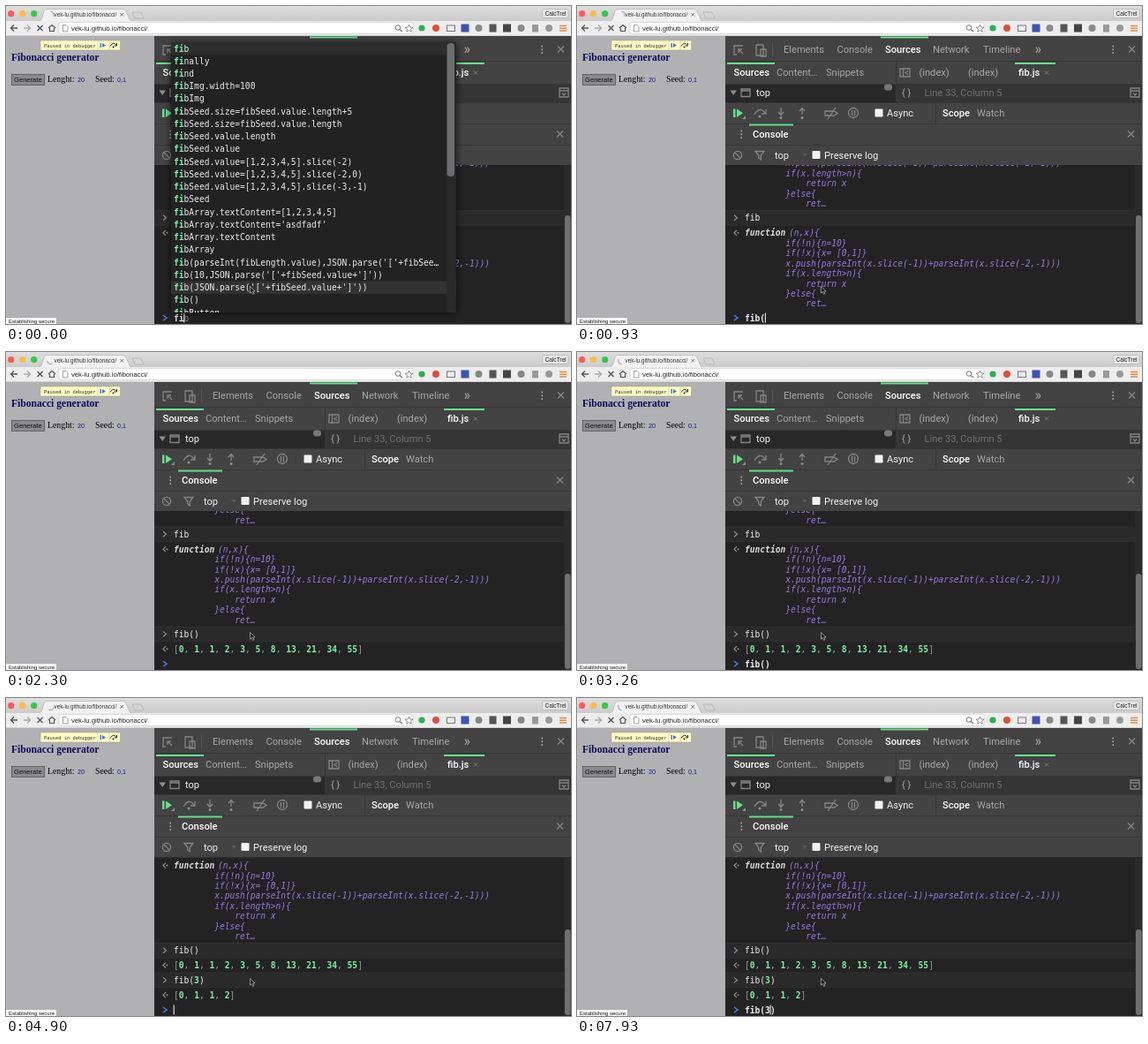
Animation, 640 px wide and 360 px high, one loop 8000 ms. Source, as an HTML page:

```html
<!DOCTYPE html>
<html lang="en">
<head>
<meta charset="utf-8">
<title>Fibonacci console</title>
<style>
  html, body { margin: 0; width: 100%; height: 100%; overflow: hidden; background: #232323; }
  svg { display: block; width: 100vw; height: 100vh; }
  text { white-space: pre; }
  .ui { font: 11.1px Roboto, sans-serif; fill: #a8a8a8; }
  .on { fill: #f2f2f2; }
  .tab { fill: #fff; font-weight: 500; }
  .faint { fill: #707070; }
  .big { font-size: 16px; }
  .sans { font-family: "Liberation Sans", Arial, sans-serif; }
  .serif { font-family: "Liberation Serif", Times, serif; }
  .mono { font: 9.6px "DejaVu Sans Mono", Menlo, monospace; fill: #ececec; }
  .bold { font-weight: bold; }
  .keyword { fill: #dcdcdc; font-weight: bold; font-style: italic; }
  .code { fill: #9479e2; font-style: italic; }
  .num { fill: #7ef0a2; font-weight: bold; }
  .dim { fill: #9a9a9a; }
  .line { fill: none; stroke: #858585; stroke-width: 1.3; }
  .accent { fill: #66e08c; }
  .spinner { transform-origin: 50.5px 10px; animation: spin .93s steps(12) infinite; }
  @keyframes spin { from { transform: rotate(-162deg); } to { transform: rotate(198deg); } }
  .popup { filter: drop-shadow(0 1px 4px #000a); }
</style>
</head>
<body>
<svg viewBox="0 0 640 360" preserveAspectRatio="none">
  <defs>
    <linearGradient id="bar" x2="0" y2="1"><stop stop-color="#dedede"/><stop offset="1" stop-color="#cbcbcb"/></linearGradient>
    <clipPath id="consoleClip"><rect x="168" y="180" width="472" height="180"/></clipPath>
    <clipPath id="popupClip"><rect x="187" y="41" width="340" height="306"/></clipPath>
  </defs>

  <!-- browser window -->
  <g class="sans">
    <rect width="640" height="17" fill="url(#bar)"/>
    <path d="M36 17.500Q40 17 41 13L43 6Q44 3.500 47 3.500H132Q135 3.500 136 6L139 13Q140 17 143 17.500Z" fill="#f1f1f1" stroke="#aaa" stroke-width=".6"/>
    <path d="M143 7H153L156 14H146Z" fill="#d5d5d5" stroke="#aaa" stroke-width=".6"/>
    <circle cx="5.700" cy="8.700" r="3.600" fill="#fc5b57"/>
    <circle cx="18.700" cy="8.700" r="3.600" fill="#fdbc40"/>
    <circle cx="31.700" cy="8.700" r="3.600" fill="#34c84a"/>
    <path class="spinner" d="M46.900 9.200A3.700 3.700 0 0 0 51.500 13.600" fill="none" stroke="#888"/>
    <text x="54.500" y="12.300" font-size="6.300" fill="#333">vek-lu.github.io/fibonacci/</text>
    <path d="M129.500 8L133 11.500M133 8L129.500 11.500" stroke="#777"/>
    <rect x="607.500" y="3.500" width="29.500" height="10" rx="2" fill="#e6e6e6" stroke="#aaa" stroke-width=".6"/>
    <text x="610.500" y="10.800" font-size="6.500" fill="#222">CalcTrel</text>
    <rect y="17" width="640" height="17" fill="#ededed"/>
    <rect x="60" y="18.500" width="401" height="13" rx="2" fill="#fff" stroke="#c6c6c6" stroke-width=".6"/>
    <path d="M13 25H5M9 21.500L5.500 25L9 28.500" fill="none" stroke="#555" stroke-width="1.300"/>
    <path d="M20 25H28M24 21.500L27.500 25L24 28.500" fill="none" stroke="#aaa" stroke-width="1.300"/>
    <path d="M35.500 22L41.500 28M41.500 22L35.500 28" stroke="#555" stroke-width="1.400"/>
    <path d="M48 25L52 21.500L56 25M49.500 25V28.500H54.500V25" fill="none" stroke="#555" stroke-width="1.200"/>
    <path d="M64.500 21.500H68L70 23.500V29H64.500Z" fill="#fff" stroke="#888" stroke-width=".8"/>
    <text x="74" y="28" font-size="7.700" fill="#222">vek-lu.github.io/fibonacci/</text>
    <circle cx="444" cy="24.500" r="2.800" fill="none" stroke="#777"/>
    <path d="M446 26.500L449 29" stroke="#777" stroke-width="1.300"/>
    <path d="M456.500 21L457.700 24L461 24.200L458.500 26.200L459.300 29.300L456.500 27.600L453.700 29.300L454.500 26.200L452 24.200L455.300 24Z" fill="none" stroke="#777" stroke-width=".8"/>
    <circle cx="471" cy="25" r="3.600" fill="#2fae57"/>
    <circle cx="487" cy="25" r="4" fill="#d8513f"/>
    <rect x="499.500" y="22" width="9" height="6.500" fill="none" stroke="#777"/>
    <rect x="515.500" y="20.500" width="9" height="9" fill="#3c55ad"/>
    <circle cx="535.500" cy="25" r="4" fill="#888"/>
    <rect x="547.500" y="20.500" width="8" height="9" fill="#555"/>
    <rect x="563" y="20.500" width="9" height="9" fill="#444"/>
    <circle cx="583.500" cy="25" r="4" fill="#888"/>
    <rect x="596" y="21" width="7" height="8.500" fill="#999"/>
    <circle cx="615" cy="25" r="4" fill="#999"/>
    <path d="M627 22.500H635M627 25.200H635M627 28H635" stroke="#e98a3c" stroke-width="1.500"/>
    <path d="M0 34H640" stroke="#aaa" stroke-width=".7"/>
  </g>

  <!-- paused page -->
  <rect y="34" width="168" height="326" fill="#b1b1b4"/>
  <rect x="39" y="39" width="90.500" height="11" rx="1" fill="#fdfbc3" stroke="#9d9b80" stroke-width=".5"/>
  <text x="43" y="46.500" font-size="5.400" font-family="DejaVu Sans Mono, monospace" fill="#333">Paused in debugger</text>
  <path d="M104 39V50M117 39V50" stroke="#c8c69c" stroke-width=".6"/>
  <path d="M106.500 42H108V47H106.500ZM109 42L113 44.500L109 47Z" fill="#4b78d4"/>
  <path d="M118 45.500Q121.500 39.500 125 44.500M125.500 42V45H122.500" fill="none" stroke="#333"/>
  <circle cx="121.500" cy="46.500" r="1" fill="#333"/>
  <g class="serif">
    <text class="bold" x="6" y="62" font-size="11.600" fill="#0c0c58">Fibonacci generator</text>
    <text x="47" y="86.300" font-size="9.800">Lenght:</text>
    <text x="101" y="86.300" font-size="9.800">Seed:</text>
  </g>
  <g class="sans">
    <rect x="6.500" y="77.500" width="37" height="12" fill="#8b8b8d" stroke="#555" stroke-width=".8"/>
    <text x="9" y="86.200" font-size="7.600" fill="#111">Generate</text>
    <text x="81" y="86" font-size="7.200" fill="#15158c">20</text>
    <text x="126" y="86" font-size="7.200" fill="#15158c">0,1</text>
    <rect y="353" width="57" height="7" fill="#f4f4f4"/>
    <text x="3" y="359" font-size="6" fill="#222">Establishing secure</text>
  </g>

  <!-- developer tools -->
  <rect x="168" y="34" width="472" height="326" fill="#232323"/>
  <rect x="168" y="34" width="472" height="146" fill="#424342"/>
  <rect x="168" y="88" width="193" height="21" fill="#282828"/>
  <rect x="361" y="88" width="279" height="21" fill="#353535"/>
  <path d="M168 62.500H640M168 88.500H640M168 109.500H640M168 133.500H640M168 157.500H640M361.500 62V109M406.500 110V133" stroke="#363636" fill="none"/>
  <path d="M221.500 42V57" stroke="#555"/>
  <g class="accent">
    <rect x="344" y="34.500" width="54" height="2"/>
    <rect x="170" y="64" width="54" height="2"/>
    <rect x="496" y="64" width="46" height="2"/>
    <rect x="195" y="133.500" width="50" height="2"/>
    <path d="M177 116.500H179.500V126H177ZM181 116.500L188 121.200L181 126Z"/>
  </g>
  <g id="labels"></g>
  <g class="line">
    <path d="M187 46V45H178V55H181M183 49L188 54M183 53V49H187"/>
    <path d="M203 44H211V56H203ZM208 49H214V57H208Z"/>
    <path d="M366 71H377V80H366ZM369.500 71V80M375 73.500L372 75.500L375 77.500"/>
    <path d="M201 123Q207 113 213 121M214 117V122H209"/>
    <path d="M231 115V123M228 120L231 123.500L234 120M255 123V115.500M252 119L255 115.500L258 119"/>
    <path d="M281 119H291L295 121.500L291 124H281ZM284 128L293 115"/>
    <path d="M311.500 118V124.500M314.500 118V124.500"/><circle cx="313" cy="121" r="5.500"/>
    <circle cx="182" cy="169" r="4.600"/><path d="M179 166L185 172"/>
    <path d="M202 164.500H212L208.300 169V174L205.700 172V169Z"/>
    <path d="M624 141.500L631 148.500M631 141.500L624 148.500M625 45.500L632 52.500M632 45.500L625 52.500"/>
    <path d="M530 73.500L534 77.500M534 73.500L530 77.500" stroke-width=".9"/>
    <path d="M627 93H637V103H627ZM627 96H637M630 98.500L632 101L634 98.500"/>
    <path d="M186 94H196V102.500H186ZM186 96H196"/>
  </g>
  <g fill="#8d8d8d">
    <path d="M173.500 95.500H181L177.200 101Z"/>
    <path d="M255 167H261L258 171Z" fill="#5a5a5a"/>
    <circle cx="207" cy="125" r="1.500"/><circle cx="231" cy="126.500" r="1.500"/><circle cx="255" cy="126.500" r="1.500"/>
    <path d="M191 128V124L187 128Z"/>
    <rect x="348" y="88.500" width="9" height="7" rx="3" fill="#777"/>
    <rect x="337.500" y="116.500" width="9" height="9" rx="1" fill="#f2f2f2"/>
    <rect x="266.500" y="164" width="9" height="9" rx="1" fill="#f2f2f2"/>
  </g>

  <g clip-path="url(#consoleClip)">
    <g id="history"></g>
    <path d="M178 350L182 353L178 356" fill="none" stroke="#4d7df0" stroke-width="1.500"/>
    <text id="prompt" class="mono bold" x="190" y="356.500"></text>
    <rect id="caret" y="347.500" width="1" height="11" fill="#fff"/>
    <rect x="632" y="180" width="8" height="180" fill="#2b2b2b"/>
    <rect id="thumb" x="633" width="6.500" rx="3.200" fill="#707070"/>
  </g>
  <g id="popups"></g>
  <path d="M276.500 317.500V325L278.300 323.400L279.600 326.300L281 325.600L279.700 322.900H282Z" fill="#111" stroke="#ddd" stroke-width=".6"/>
</svg>

<script>
const $ = id => document.getElementById(id);
const LOOP = 8000, CHAR = 5.78, LEFT = 190, ROW = 16.8;

function add(parent, tag, attrs = {}, content = "") {
  const node = document.createElementNS("http://www.w3.org/2000/svg", tag);
  for (const key in attrs) node.setAttribute(key, attrs[key]);
  node.textContent = content;
  return parent.appendChild(node);
}

// parts: [class, text] pairs laid out as one line centred on y
function mono(parent, x, y, ...parts) {
  const line = add(parent, "text", { class: "mono", x, y: y + 3.5 });
  parts.forEach(([cls, s]) => add(line, "tspan", { class: cls }, s));
}

const label = (x, y, s, cls = "") => add($("labels"), "text", { class: "ui " + cls, x, y: y + 4 }, s);
[[234, 49, "Elements"], [294.5, 49, "Console"], [349, 49, "Sources", "tab"], [403, 49, "Network"],
 [460, 49, "Timeline"], [518.5, 50, "»", "big"], [601.5, 49, "⋮", "bold"], [177.5, 75, "Sources", "tab"],
 [226, 75, "Content…"], [282, 75, "Snippets"], [387.5, 75, "(index)"], [443, 75, "(index)"],
 [500, 75, "fib.js", "tab"], [203, 98, "top", "on"], [368, 98, "{ }"], [393.5, 98, "Line 33, Column 5", "faint"],
 [351, 121, "Async", "on"], [414, 121, "Scope", "tab"], [453, 121, "Watch"], [180.5, 145, "⋮", "bold"],
 [199, 145, "Console", "tab"], [224, 169, "top", "on"], [280, 169, "Preserve log", "on"],
].forEach(args => label(...args));

// console history
const BODY = ["if(!n){n=10}", "if(!x){x= [0,1]}", "x.push(parseInt(x.slice(-1))+parseInt(x.slice(-2,-1)))",
  "if(x.length>n){", "    return x", "}else{", "    ret…"];

function chevron(parent, y, isResult) {
  const d = isResult ? "l-3 3l3 3" : "l3.500 3l-3.500 3";
  add(parent, "path", { d: `M${isResult ? 181 : 178} ${y - 3}${d}`, fill: "none", stroke: "#909090", "stroke-width": 1.2 });
  if (isResult) add(parent, "circle", { cx: 182.5, cy: y, r: 1, fill: "#909090" });
}

function functionBody(parent, y) {
  BODY.forEach((s, i) => mono(parent, LEFT + 8 * CHAR, y + 11.45 * (i + 1), ["code", s]));
}

function command(parent, y, ...parts) {
  add(parent, "rect", { x: 168, y: y - 8, width: 464, height: 16, fill: "#2a2a2a" });
  add(parent, "path", { d: `M168 ${y - 8.3}H632M168 ${y + 8.3}H632`, stroke: "#343434", "stroke-width": .7 });
  chevron(parent, y, false);
  mono(parent, LEFT, y, ...parts);
}

function result(parent, y, numbers) {
  chevron(parent, y, true);
  const parts = numbers.flatMap((n, i) => [["dim", i ? ", " : "["], ["num", n]]);
  mono(parent, LEFT, y, ...parts, ["dim", "]"]);
}

const past = $("history");
functionBody(past, 143.5);
command(past, 239.8, ["", "fib"]);
chevron(past, 256.8, true);
mono(past, LEFT, 256.8, ["keyword", "function"]);
mono(past, LEFT + 8 * CHAR + 3.8, 256.8, ["code", "(n,x){"]);
functionBody(past, 256.8);

const runs = [
  [[["", "fib()"]], [0, 1, 1, 2, 3, 5, 8, 13, 21, 34, 55]],
  [[["", "fib("], ["num", "3"], ["", ")"]], [0, 1, 1, 2]],
].map(([input, output], i) => {
  const group = add(past, "g");
  const y = 353 + i * 2 * ROW;
  command(group, y, ...input);
  result(group, y + ROW, output);
  return group;
});

// completion popups
const parse = "JSON.parse('['+fibSeed.value+']'))";
const slice = args => `fibSeed.value=[1,2,3,4,5].slice(${args})`;
const suggestions = cut => ["fibImg.width=100", "fibImg", "fibSeed.size=fibSeed.value.length+5",
  "fibSeed.size=fibSeed.value.length", "fibSeed.value.length", "fibSeed.value",
  slice("-2"), slice("-2,0"), slice("-3,-1"), "fibSeed", "fibArray.textContent=[1,2,3,4,5]",
  "fibArray.textContent='asdfadf'", "fibArray.textContent", "fibArray",
  `fib(parseInt(fibLength.value),JSON.parse('['+${cut}…`, "fib(10," + parse, "fib(" + parse, "fib()", "fibButton"];

function popup(prefix, rows, width, thumbHeight) {
  const group = add($("popups"), "g", { class: "popup" });
  add(group, "rect", { x: 187, y: 41, width, height: 306, fill: "#222" });
  add(group, "rect", { x: 187, y: 41, width, height: 14.3, fill: "#2d2d2d" });
  add(group, "rect", { x: 187, y: 311.5, width, height: 14.3, fill: "#323232" });
  add(group, "rect", { x: 175.5 + width, y: 41, width: 11, height: 306, fill: "#292929" });
  add(group, "rect", { x: 176.5 + width, y: 42, width: 8.5, height: thumbHeight, rx: 4, fill: "#6d6d6d" });
  const list = add(group, "g", { "clip-path": "url(#popupClip)" });
  rows.forEach((s, i) => mono(list, LEFT, 48 + 14.24 * i,
    ["num", s.slice(0, prefix)], ["", s.slice(prefix)]));
  return group;
}

const wide = popup(2, ["fib", "finally", "find", ...suggestions("fibSee")], 323, 151);
const narrowed = popup(3, ["fib", ...suggestions("fibSeed"), "fibSeed", "fibSeed.style.border=0"], 330, 158);

// [time, prompt text, caret column, finished runs]
const KEYS = [
  [0, "fi", 2, 0], [430, "fib", 3, 0], [870, "fib(", 4, 0], [1060, "fib()", 5, 0], [1460, "", 0, 1],
  [2630, "fib()", 5, 1], [3930, "fib()", 4, 1], [4500, "fib(3)", 5, 1], [4850, "", 0, 2],
  [6030, "fib(3)", 6, 2], [7440, "fib(3)", 5, 2],
];
const THUMB_TOP = [237, 251, 262];
const POPUP_CLOSE = 925;
const show = (node, visible) => node.setAttribute("visibility", visible ? "visible" : "hidden");
let current;

function render(now) {
  const t = now % LOOP;
  const key = KEYS.findLast(k => k[0] <= t);
  const [start, input, column, done] = key;
  if (key !== current) {
    current = key;
    $("prompt").textContent = input;
    if (start === 0) add($("prompt"), "tspan", { fill: "#858585", "font-weight": "normal" }, "b");
    $("caret").setAttribute("x", LEFT + column * CHAR - 0.3);
    past.setAttribute("transform", `translate(0 ${-2 * ROW * done})`);
    runs.forEach((group, i) => show(group, i < done));
    $("thumb").setAttribute("y", THUMB_TOP[done]);
    $("thumb").setAttribute("height", 359 - THUMB_TOP[done]);
  }
  show($("caret"), (t - start) % 1000 < 500);
  show(wide, t < KEYS[1][0]);
  show(narrowed, t >= KEYS[1][0] && t < POPUP_CLOSE);
  requestAnimationFrame(render);
}
render(performance.now());
</script>
</body>
</html>
```
